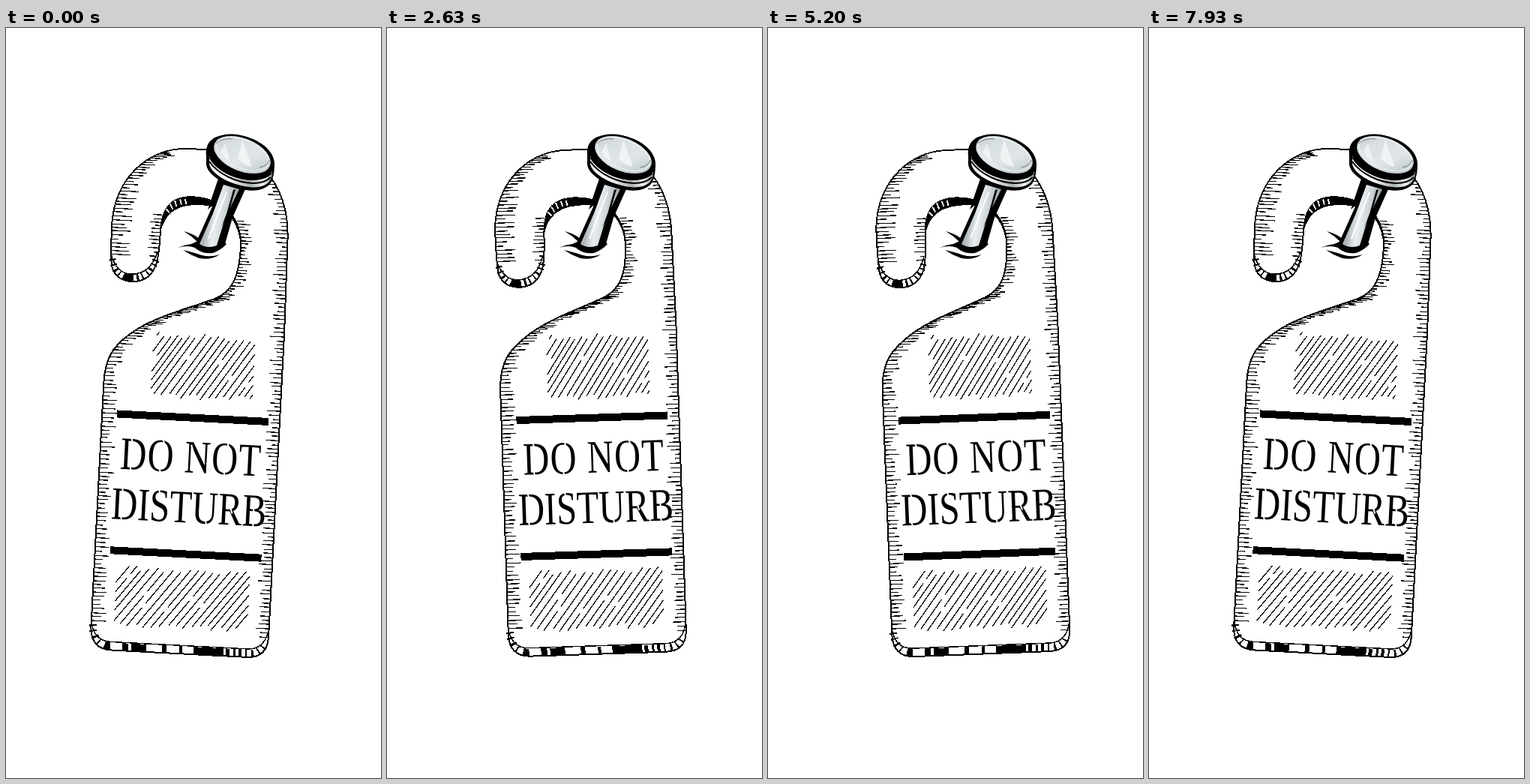
An HTML page for the animation above (8.01 s loop, 500 by 1000 pixels).

```html
<!DOCTYPE html>
<html lang="en">
<head>
<meta charset="utf-8">
<title>Do not disturb</title>
<style>
  html, body { margin: 0; width: 100%; height: 100%; overflow: hidden; background: #fff; }
  svg { display: block; width: 100%; height: 100%; }
  .line { fill: none; stroke: #000; }
  .white { fill: none; stroke: #fff; }
  text { font: 62px "Liberation Serif", "Noto Serif", serif; text-anchor: middle; }
</style>
</head>
<body>
<svg viewBox="0 0 500 1000">
  <defs>
    <linearGradient id="face" x1="0" y1="0" x2="1" y2=".6">
      <stop offset="0" stop-color="#b9c1c5"/>
      <stop offset=".35" stop-color="#d9e0e3"/>
      <stop offset=".7" stop-color="#dfe5e8"/>
      <stop offset="1" stop-color="#c3cbcf"/>
    </linearGradient>
    <linearGradient id="rim">
      <stop offset="0" stop-color="#e8ecee"/>
      <stop offset=".3" stop-color="#fff"/>
      <stop offset=".65" stop-color="#aab0b3"/>
      <stop offset=".85" stop-color="#eef1f2"/>
      <stop offset="1" stop-color="#8f9699"/>
    </linearGradient>
    <linearGradient id="shaft" x1="0" y1=".4" x2="1" y2=".65">
      <stop offset=".2" stop-color="#aeb6ba"/>
      <stop offset=".42" stop-color="#e9eef0"/>
      <stop offset=".62" stop-color="#cfd6d9"/>
      <stop offset=".85" stop-color="#9da5a9"/>
    </linearGradient>
  </defs>

  <g id="slit">
    <path d="M237 271Q250 274 262 284L259 289Q249 278 237 271Z"/>
    <path d="M229 293Q242 289 252 293Q262 302 276 300Q287 296 294 288L284 279L256 284L247 288Q238 289 229 293Z"/>
    <path class="white" d="M240 293Q249 296 258 299" stroke-width="2"/>
    <path d="M236 296Q250 299 261 303Q272 306 285 302Q273 310 258 307Q246 303 236 296Z"/>
  </g>

  <g id="tag">
    <g shape-rendering="crispEdges">
      <path fill="#fff" stroke="#000" stroke-width="2" d="M145 320C143 300 143 285 143 268C143 210 183 163 240 162C262 162 285 162 300 164C345 172 378 215 378 280L380 400V808Q379 835 352 835H172Q144 835 143 806V480C143 440 158 424 185 405C215 385 250 375 285 360C307 350 316 330 316 290C316 255 295 227 250 226C218 226 208 245 208 275C208 300 207 310 204 320Q196 343 172 343Q148 341 145 320Z"/>
      <path d="M208 275C208 245 218 226 250 226C295 227 316 255 316 290C313 262 300 240 275 237C240 234 215 240 208 275Z"/>
      <path class="white" stroke-width="2" d="M214 244l5 5M219 237l4 7M225 232l3 8M232 230l2 7M239 229l1 7"/>
      <path class="line" stroke-width="1.5" d="M144 308Q152 333 172 333Q197 332 205 303M143 797Q147 824 170 824H354Q376 823 380 796"/>
      <path class="line" stroke-width="9" stroke-dasharray="2 5 2 5 3 4 2 5 14 4 3 4 2 6 2 4 3 5 2 4" d="M146 314Q151 338 172 338Q198 337 205 309"/>
      <path class="line" stroke-width="10" stroke-dasharray="2 5 2 6 3 6 2 8 8 16 8 4 20 21 6 17 4 15 40 3 5 5 3 4 4 5 2 6 3 6 2 6 2 40" d="M145 802Q147 830 170 830H354Q376 830 379 800"/>
      <path id="hatching" class="line" stroke-width="1.3"/>
      <path d="M163 515H365V525H163ZM163 697H365V707H163Z"/>
    </g>
    <g id="lettering">
      <text transform="translate(264.5 593) scale(.78 1)" letter-spacing="1.6">DO NOT</text>
      <text transform="translate(265 660) scale(.78 1)">DISTURB</text>
      <path id="cuts" class="white" stroke-width="2"/>
    </g>
  </g>

  <g id="nail">
    <path d="M284 198L269 242L276 236L253 287Q262 299 283 293L292 288L302 253L319 215Z"/>
    <path fill="url(#shaft)" d="M290 209L276 247L258 288Q268 295 281 290L293 251L311 215Z"/>
    <path d="M303 216L294 248L287 266L297 246L306 215ZM284 218L271 254L267 262L280 236Z"/>
    <path class="white" stroke-width="2" d="M294 219L281 252L270 281"/>
    <path d="M267 170C265 150 279 141 303 142C335 144 358 163 358 181C358 193 356 202 352 208C343 218 325 219 308 213C288 207 267 194 267 181Z"/>
    <path fill="url(#rim)" d="M271 171C277 188 301 202 328 203C343 203 352 198 355 191C355 198 353 203 349 207C338 215 322 213 306 208C287 202 271 190 271 180Z"/>
    <path class="line" stroke-width="2" d="M271 178C283 195 307 206 329 207Q345 207 353 199"/>
    <path class="line" stroke-width="1.2" d="M271 173C281 190 306 202 327 202Q346 202 354 194"/>
    <g transform="rotate(22 315 169)">
      <ellipse cx="315" cy="169" rx="41" ry="23" fill="url(#face)" stroke="#000" stroke-width="2.4"/>
      <ellipse cx="315" cy="168" rx="37" ry="19" fill="none" stroke="#eef2f3" stroke-width="1.2"/>
    </g>
    <path fill="#f3f6f7" d="M315 149L309 174Q318 184 328 185ZM292 154L286 166Q291 174 299 178Z" opacity=".85"/>
    <path class="line" stroke="#8e979b" stroke-width="1" opacity=".45" d="M280 154Q289 146 302 148M338 186Q350 183 351 176"/>
  </g>
</svg>
<script>
const NS = "http://www.w3.org/2000/svg";
const byId = id => document.getElementById(id);
const PIVOT = "262 232", SWING = 3, LOOP = 8010, LAST = 159;

let seed = 11;
const rand = (a, b) => {
  seed = (seed * 16807) % 2147483647;
  return a + (b - a) * seed / 2147483647;
};

// Horizontal ticks that start on an edge
function ticks(d, step, min, max, start = 0) {
  const edge = document.createElementNS(NS, "path");
  edge.setAttribute("d", d);
  let out = "";
  for (let s = start, end = edge.getTotalLength(); s < end; s += step * rand(.8, 1.2)) {
    const p = edge.getPointAtLength(s);
    out += `M${p.x.toFixed(1)} ${p.y.toFixed(1)}h${rand(min, max).toFixed(1)}`;
  }
  return out;
}

// Slanted shading inside a box, some lines broken by a gap
function shade(x0, y0, x1, y1, slope, step) {
  let out = "";
  const line = (c, a, b) => {
    if (b - a > 4) out += `M${(c - slope * (a - y0)).toFixed(1)} ${a.toFixed(1)}L${(c - slope * (b - y0)).toFixed(1)} ${b.toFixed(1)}`;
  };
  for (let c = x0 + 9; c < x1 + slope * (y1 - y0) - 6; c += step * rand(.85, 1.15)) {
    const top = Math.max(y0 + rand(0, 9), y0 + (c - x1) / slope);
    const end = Math.min(y1 - rand(0, 9), y0 + (c - x0) / slope);
    const gap = rand(0, 1) < .35 ? top + (end - top) * rand(.25, .8) : end;
    line(c, top, gap);
    line(c, gap + 6, end);
  }
  return out;
}

byId("hatching").setAttribute("d",
  ticks("M240 162C183 163 143 210 143 268C143 285 143 300 145 310", 5, 10, 26, 35) +
  ticks("M209 252L207 300L204 312", 5, -16, -6) +
  ticks("M352 195C372 220 378 250 378 280L380 400V808", 5.5, -19, -7) +
  ticks("M309 255C316 270 316 280 316 290C316 330 307 350 285 360", 4.5, 6, 17) +
  ticks("M285 360C250 375 215 385 185 405C158 424 143 440 143 480V800", 5.5, 8, 20) +
  shade(206, 406, 342, 497, .66, 9) +
  shade(173, 720, 351, 803, .76, 10));

// Stencil gaps in the lettering
const cuts = [[184, 554], [184, 592], [226, 553], [223, 592], [265, 561], [287, 584], [312, 553], [309, 592],
  [175, 621], [175, 659], [224, 620], [288, 659], [321, 641], [351, 640], [351, 659]];
byId("cuts").setAttribute("d", cuts.map(([x, y]) => `M${x - 1} ${y - 5}l3 9`).join(""));

// cubic-bezier(.42, 0, .58, 1)
function easeInOut(x) {
  let lo = 0, hi = 1, s = .5;
  for (let i = 0; i < 24; i++) {
    s = (lo + hi) / 2;
    const at = 3 * s * (1 - s) ** 2 * .42 + 3 * s * s * (1 - s) * .58 + s ** 3;
    if (at < x) lo = s; else hi = s;
  }
  return s * s * (3 - 2 * s);
}

function draw(ms) {
  const t = ms % LOOP;
  // The picture steps twice per 100 ms, at 0 and at 30
  const step = Math.min(LAST, 2 * Math.floor(t / 100) + (t % 100 >= 30 ? 1 : 0));
  const u = (step + 1) % 40 / 20;
  const e = u < 1 ? easeInOut(u) : 1 - easeInOut(u - 1);
  byId("tag").setAttribute("transform", `rotate(${(SWING * (1 - 2 * e)).toFixed(3)} ${PIVOT})`);
}

const begin = performance.now();
function tick() {
  draw(performance.now() - begin);
  requestAnimationFrame(tick);
}
tick();
</script>
</body>
</html>
```
